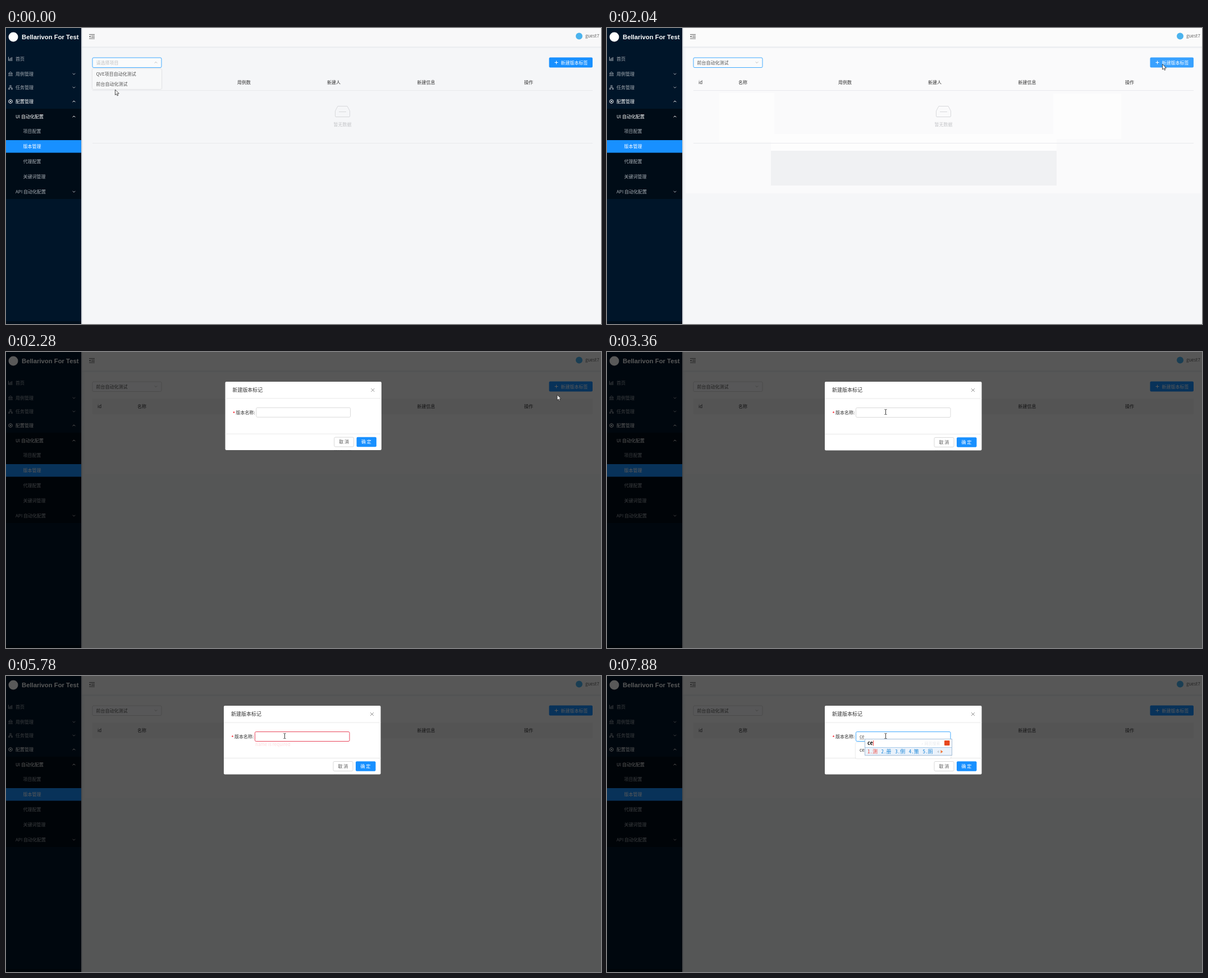
These frames come from a looping animation (1060x528 px, 8 s). An HTML page:

```html
<!DOCTYPE html>
<html lang="zh">
<head>
<meta charset="utf-8">
<style>
html, body { margin: 0; width: 100%; height: 100%; overflow: hidden; background: #f5f6f8; }
svg { display: block; width: 1060px; height: 528px; font-family: "Noto Sans CJK SC", "Noto Sans CJK", "Noto Sans", sans-serif; }
text { white-space: pre; }
.soft { filter: drop-shadow(0 .5px 1px rgba(0,0,0,.2)); }
</style>
</head>
<body>
<svg id="stage" viewBox="0 0 1060 528"></svg>
<script>
const text = (x, y, s, fill = '#333', size = 8, extra = '') =>
  `<text x="${x}" y="${y + size * .36}" fill="${fill}" font-size="${size}" ${extra}>${s}</text>`;
const rect = (x, y, w, h, fill, extra = '') =>
  `<rect x="${x}" y="${y}" width="${w}" height="${h}" fill="${fill}" ${extra}/>`;
const line = (d, stroke, width = 1, extra = '') =>
  `<path d="${d}" fill="none" stroke="${stroke}" stroke-width="${width}" ${extra}/>`;
const group = (id, body, extra = '') => `<g id="${id}" ${extra}>${body}</g>`;
const chevron = (x, y, up, color) =>
  line(up ? `M${x - 2.3} ${y + 1.2}l2.3 -2.3 2.3 2.3` : `M${x - 2.3} ${y - 1.2}l2.3 2.3 2.3 -2.3`, color);
const bold = 'font-weight="700"', medium = 'font-weight="500"';
const blue = '#1890ff', pale = '#a6adb4', ink = '#333';

function sidebar() {
  const item = (x, y, s, on, arrow) => text(x, y, s, on ? '#fff' : pale, 8, on ? medium : '') +
    (arrow ? chevron(121, y, arrow === 'up', on ? '#fff' : pale) : '');
  return rect(0, 0, 134, 528, '#001529') + rect(0, 144, 134, 161, '#000c17') +
    rect(0, 523, 134, 5, '#000d1a') + rect(0, 200, 134, 22.5, blue) +
    '<circle cx="13" cy="16" r="8.5" fill="#fff"/>' +
    text(28, 15.5, 'Bellarivon For Test', '#fff', 11.3, bold + ' font-family="Liberation Sans, sans-serif"') +
    line('M4.5 51.5v6.5h7M6.5 57v-2.5M8.5 57v-4M10.5 57v-5', pale) +
    line('M4.5 81l3.5 -3 3.5 3zM5.5 81v3.5M8 81v3.5M10.5 81v3.5M4 85h8', pale, .8) +
    line('M6.8 102.5h2.4v2.4h-2.4zM4.5 107.5h2v2h-2zM9.5 107.5h2v2h-2zM8 105v1.3M5.5 107.5v-1.2h5v1.2', pale, .8) +
    line('M8 127.5l3 1.7v3.6l-3 1.7 -3 -1.7v-3.6z', '#fff') + '<circle cx="8" cy="131" r="1.2" fill="#fff"/>' +
    item(17, 55, '首页') + item(17, 82, '用例管理', 0, 'down') + item(17, 106, '任务管理', 0, 'down') +
    item(17, 131, '配置管理', 1, 'up') + item(17, 158, 'UI 自动化配置', 1, 'up') +
    item(30.5, 184.5, '项目配置') + item(30.5, 211.5, '版本管理', 1) + item(30.5, 238, '代理配置') +
    item(30.5, 265, '关键词管理') + item(17, 292, 'API 自动化配置', 0, 'down');
}

function page() {
  const heads = [[163, 'id'], [234, '名称'], [412, '用例数'], [572, '新建人'], [732.5, '新建信息'], [923, '操作']];
  return rect(134, 0, 926, 528, '#f5f6f8') + rect(134, 0, 926, 33, '#f8f8f9') +
    group('light', rect(134, 0, 926, 33, '#fbfbfb') + rect(140, 36, 918, 259, '#fafafb', 'id="panel"') +
      group('patches', rect(200, 116, 98, 87, '#fdfdfd') + rect(795, 117, 121, 81, '#fdfdfd') +
        rect(292, 189, 509, 30, '#fdfdfd') + rect(292, 219, 509, 62, '#f0f1f3'))) +
    rect(154, 83, 891, 28, '#f1f1f3', 'id="headRow"') +
    rect(134, 33, 926, 2.5, '#eceef1') + rect(134, 0, 3, 528, 'url(#edge)') +
    line('M148 11.5h10M152 14h6M152 16.5h6M148 19h10', '#555', .9) + '<path d="M150.5 13.3v4l-2.5 -2z" fill="#555"/>' +
    '<circle cx="1021" cy="14.5" r="6" fill="#4bb3ee"/>' + text(1032, 14.5, 'guest7', '#666') +
    heads.map(([x, s]) => text(x, 97, s, ink, 8, medium)).join('') +
    line('M154 111.5H1045M154 205.5H1045', '#e8e9ec', 1, 'id="rules"') +
    line('M586.5 148l4.5 -8.5h17l4.5 8.5v9q0 1.5 -1.5 1.5h-23q-1.5 0 -1.5 -1.5zM593 149.5h13', '#d4d5d8', .9) +
    text(583.5, 172, '暂无数据', '#c4c5c8') +
    rect(154, 53, 123, 17.5, '#fafbfc', 'id="select" rx="2"') +
    group('hint', text(160.5, 62, '请选择项目', '#bfbfbf') + chevron(267, 61.5, true, '#bbb')) +
    group('picked', text(160.5, 62, '前台自动化测试', '#555') + chevron(267, 61.5, false, '#bbb')) +
    group('menu', rect(154, 73, 123, 36, '#f7f8f9', 'rx="2" class="soft"') +
      text(160.5, 82, 'QVE项目自动化测试', '#555') + text(160.5, 100, '前台自动化测试', '#555')) +
    rect(967.5, 52.5, 77.5, 18, blue, 'id="create" rx="2"') + line('M977.5 61.5h6M980.5 58.5v6', '#fff') +
    text(988.5, 61.8, '新建版本标签', '#fff', 8, medium);
}

function modal() {
  return rect(388, 53, 279.5, 122.5, '#fff', 'rx="2"') +
    text(401, 68, '新建版本标记', ink, 9) + line('M649 65l6 6M655 65l-6 6', '#888', .9) +
    line('M388 83H667.5M388 146.5H667.5', '#e8e8e8') +
    text(401.5, 109, '*', '#f5222d', 8, bold) + text(407, 108, '版本名称:', ink) +
    rect(443.5, 99.5, 168.5, 17, '#fff', 'id="input" rx="2"') + text(450, 108.3, '', '#555', 8, 'id="value"') +
    line('M450 112.5h9', '#555', .6, 'id="underline"') + rect(453, 103, .9, 9.5, '#333', 'id="caret"') +
    text(444, 122, 'name is required', '#f5222d', 8, 'id="error"') +
    rect(583, 152.5, 35, 17, '#fff', 'rx="2" stroke="#d9d9d9"') + text(591.5, 161, '取 消', '#555') +
    rect(623, 152.3, 35.5, 17.5, blue, 'rx="2"') + text(631.5, 161, '确 定', '#fff', 8, medium) +
    group('options', rect(443, 119, 169.5, 48, '#fff', 'id="list" rx="2" class="soft"') +
      text(450, 132, 'ceshi', ink) + text(450, 152.5, 'cindra代理调试', ink, 8, 'id="second"'));
}

function ime() {
  return rect(459.5, 112.5, 155, 29, '#fff', 'stroke="#a5bdd6"') +
    rect(460, 128, 154, 13, '#eaf2fb') + line('M460 127.5H614', '#a9cbe9') +
    text(464, 119.8, '', '#111', 9, 'id="pinyin" font-weight="700"') + rect(474.5, 115, .9, 9.5, '#f33', 'id="imeCaret"') +
    text(560, 120, '⌕ 网页搜索', '#e6e8ec', 7) + rect(601, 115, 9.5, 9, '#e8481f', 'rx="1"') +
    [0, 1, 2, 3, 4].map(i => text(464 + i * 24.6, 135, '', i ? '#1a86d8' : '#f0433a', 9,
      'class="pick" font-family="Noto Sans Mono CJK SC, Noto Sans CJK SC, monospace"')).join('') +
    '<path d="M591.5 132.5v5l-3.5 -2.5z" fill="#c5ccd4"/><path d="M594.5 132v6l4 -3z" fill="#f0783a"/>';
}

const stage = document.getElementById('stage');
stage.innerHTML = '<defs><linearGradient id="edge"><stop stop-color="#c3c7cc"/><stop offset="1" stop-color="#c3c7cc" stop-opacity="0"/></linearGradient></defs>' +
  page() + sidebar() + rect(0, 0, 1060, 528, '#000', 'id="mask"') +
  group('dialog', modal()) + group('ime', ime()) +
  group('arrow', '<path d="M0 0v9.5l2.2 -2 1.5 3.3 1.6 -.7 -1.5 -3.2h3z" fill="#fff" stroke="#222" stroke-width=".8"/>') +
  group('beam', line('M-2 -4.5h1.3l.7 .6 .7 -.6h1.3M0 -4v8M-2 4.5h1.3l.7 -.6 .7 .6h1.3', '#222', .9));

const el = id => document.getElementById(id);
const show = (id, on) => el(id).setAttribute('display', on ? 'inline' : 'none');
const set = (id, attrs) => { for (const k in attrs) el(id).setAttribute(k, attrs[k]); };

// Pointer: time, x, y
const path = [[0, 194.5, 110], [240, 196, 100], [480, 197, 100], [960, 420, 95], [1560, 900, 80], [1920, 990, 66],
  [2040, 989.5, 64.5], [2160, 987, 70], [2280, 982, 76.5], [2640, 800, 105], [3120, 540, 112], [3360, 496.5, 107]];
// Field: time, value, option count, look, candidates
const states = [[0, '', 0, 'idle'], [3750, '', 0, 'focus'], [4280, 'c', 2, 'focus'], [4560, 'ce', 1, 'focus'],
  [4840, 'ces', 1, 'focus'], [5110, 'ce', 1, 'focus'], [5370, 'c', 2, 'focus'], [5510, '', 0, 'error'],
  [6050, 'c', 0, 'focus'], [6200, 'ce', 1, 'focus'], [6320, 'ce', 1, 'focus'], [6870, 'c', 2, 'focus'],
  [7010, '', 0, 'error'], [7300, 'c', 2, 'focus', '才从出次此'], [7600, 'ce', 1, 'focus', '测册侧策厕']];
const borders = { idle: '#d9d9d9', focus: '#40a9ff', error: '#e8455a' };

function pointer(t) {
  const q = Math.floor(t / 120) * 120;
  const i = path.findIndex(p => p[0] > q);
  if (i < 0) return path[path.length - 1].slice(1);
  const [a, b] = [path[i - 1], path[i]], k = (q - a[0]) / (b[0] - a[0]);
  return [a[1] + (b[1] - a[1]) * k, a[2] + (b[2] - a[2]) * k];
}

function draw(t) {
  const chosen = t >= 400, open = t >= 2160, settled = t >= 2280;
  show('menu', !chosen);
  show('hint', !chosen);
  show('picked', chosen);
  show('light', t >= 720);
  show('patches', !open);
  show('headRow', settled);
  show('rules', !settled);
  set('panel', { height: settled ? 182 : 259 });
  set('select', { stroke: open ? '#d9d9d9' : '#40a9ff' });
  set('create', { fill: t >= 1800 && !open ? '#38a1ff' : blue });

  show('mask', open);
  set('mask', { opacity: settled ? .65 : .38 });
  show('dialog', open);
  const s = !settled ? .938 : t < 2430 ? .9957 : 1;
  set('dialog', { opacity: settled ? 1 : .96, transform: `translate(985 53) scale(${s}) translate(-985 -53)` });

  const [since, value, count, look, picks] = states.filter(f => f[0] <= t).pop();
  const caretOn = t - since < 270;
  set('input', { stroke: borders[look] });
  el('value').textContent = value;
  const end = 450 + (value ? el('value').getComputedTextLength() : 0);
  set('caret', { x: end - .9 });
  show('caret', look !== 'idle' && caretOn);
  show('underline', picks);
  set('underline', { d: `M450 112.5H${end}` });
  set('error', { opacity: look === 'error' ? Math.max(0, Math.min(1, (t - since - 220) / 330)) : 0 });
  show('options', count);
  show('second', count > 1);
  set('list', { height: count > 1 ? 48 : 28 });

  show('ime', picks);
  if (picks) {
    el('pinyin').textContent = value;
    set('imeCaret', { x: 464.4 + el('pinyin').getComputedTextLength() });
    document.querySelectorAll('.pick').forEach((n, i) => n.textContent = `${i + 1}.${picks[i]}`);
  }

  const [x, y] = pointer(t), beam = t > 2430 && x < 612;
  show('arrow', !beam);
  show('beam', beam);
  set(beam ? 'beam' : 'arrow', { transform: `translate(${x} ${y})` });
}

const start = performance.now();
function tick() {
  draw((performance.now() - start) % 8000);
  requestAnimationFrame(tick);
}
tick();
</script>
</body>
</html>
```
